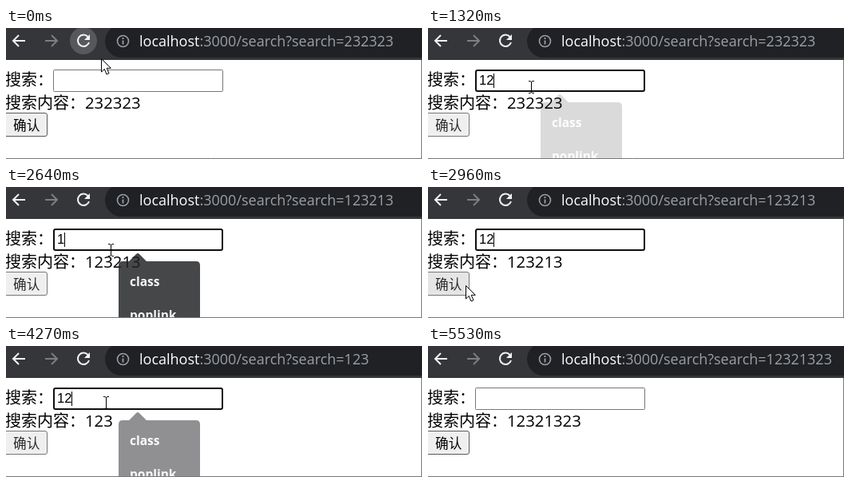
An HTML page that plays this animation: 521 px wide and 164 px high, repeating every 5.87 s.

```html
<!DOCTYPE html>
<html lang="zh-CN">
<head>
<meta charset="utf-8">
<title>Search</title>
<style>
html, body { margin: 0; width: 100%; height: 100%; overflow: hidden; background: #fff; }
svg { display: block; }
text { white-space: pre; }
.url { font: 18px "Open Sans", "Noto Sans", sans-serif; fill: #9aa0a6; }
.zh { font: 300 20px "Noto Sans CJK SC", "Noto Sans CJK", sans-serif; }
.num { font: 20.3px "Open Sans", "Noto Sans", sans-serif; }
.field { font: 16.67px "Liberation Sans", Arial, sans-serif; }
.btn { font: 300 16.67px "Noto Sans CJK SC", "Noto Sans CJK", sans-serif; }
.item { font: bold 15.5px "Open Sans", "Noto Sans", sans-serif; fill: #f4f5f6; }
.icon { fill: none; stroke: #f1f3f4; stroke-width: 2; }
</style>
</head>
<body>
<svg width="521" height="164" viewBox="0 0 521 164">
  <rect width="521" height="40" fill="#35363a"/>
  <rect x="124" y="-4" width="440" height="41" rx="20.5" fill="#202124"/>
  <path class="icon" d="M24 16H9M16 9l-7 7 7 7"/>
  <path class="icon" d="M49 16H64M57 9l7 7-7 7" style="stroke:#7d7e82"/>
  <circle id="halo" cx="97" cy="16" r="17" fill="#57585c"/>
  <path class="icon" d="M102.500 11A7.200 7.200 0 1 0 104 18"/>
  <path d="M105 8v7h-7z" fill="#f1f3f4"/>
  <circle cx="146.500" cy="16.500" r="7" fill="none" stroke="#9aa0a6" stroke-width="1.600"/>
  <path d="M146.500 12v2M146.500 15.500v5" stroke="#9aa0a6" stroke-width="1.800"/>
  <text class="url" x="167" y="23"><tspan fill="#fff">localhost</tspan>:3000/search?search=<tspan id="query"></tspan></text>

  <text class="zh" x="-1" y="72">搜索：</text>
  <rect id="box" fill="#fff"/>
  <text id="typed" class="field" x="64" y="71"></text>
  <path id="caret" d="M.5 57V75" stroke="#000"/>
  <text class="zh" x="-1" y="101">搜索内容：</text>
  <text id="result" class="num" x="99" y="101"></text>
  <rect id="button" x="-3.500" y="106.500" width="55" height="29" rx="2.500"/>
  <text id="label" class="btn" x="9" y="128">确认</text>

  <g id="popup">
    <path d="M146 93H154L163 84Q165 82 167 84L176 93H238Q243 93 243 98V170H141V98Q141 93 146 93Z" fill="#202124"/>
    <text class="item" x="155" y="124">class</text>
    <text class="item" x="155" y="166">poplink</text>
  </g>
  <path d="M0 163.500H521M520.500 40V164" stroke="#77787b"/>

  <g id="mouse">
    <path id="arrow" d="M.5 .5V17L4.300 13.400 7 20 10 18.700 7.200 12.300H12.300Z" fill="#fff" stroke="#000"/>
    <path id="beam" d="M-3-7.500H-1L.5-6.500 2-7.500H4M.5-6.500V6.500M-3 7.500H-1L.5 6.500 2 7.500H4" fill="none" stroke="#000"/>
  </g>
</svg>
<script>
const LOOP = 5870;
const $ = id => document.getElementById(id);
const set = (id, attrs) => {
  for (const k in attrs) $(id).setAttribute(k, attrs[k]);
};
const clamp = v => Math.max(0, Math.min(1, v));
const ease = v => v * v * (3 - 2 * v);

// Each search: click into the field, type at a steady pace, go to the button, send.
const rounds = [
  { text: "123213", focus: 860, type: 1170, pace: 100, go: 1400, send: 1820, home: [129, 74] },
  { text: "123", focus: 2370, type: 2610, pace: 200, go: 2660, send: 3370, home: [131, 79] },
  { text: "12321323", focus: 3940, type: 4180, pace: 85, go: 4625, send: 5090, home: [125, 71] }
];

// The pointer glides from stop to stop.
const button = [47, 123];
const glides = [{ at: 30, span: 150, to: [123, 70] }];
rounds.forEach((r, i) => {
  const back = i ? rounds[i - 1].send + 20 : 350;
  glides.push({ at: back, span: 400, to: r.home }, { at: r.go, span: 300, to: button });
});
glides.push({ at: 5350, span: 180, to: [436, 172] });

const pointerAt = t => glides.reduce((pos, g) => {
  const k = ease(clamp((t - g.at) / g.span));
  return pos.map((v, i) => v + (g.to[i] - v) * k);
}, [119, 38]);

function draw(t) {
  const sent = rounds.filter(r => t >= r.send).pop();
  $("query").textContent = $("result").textContent = sent ? sent.text : "232323";

  const now = rounds.find(r => t >= r.focus && t < r.send);
  const count = now ? Math.max(0, Math.floor((t - now.type) / now.pace) + 1) : 0;
  const typed = now ? now.text.slice(0, count) : "";
  $("typed").textContent = typed;
  const end = 64 + Math.floor(typed.length * 9.27);
  set("caret", { transform: `translate(${end})`, opacity: now ? 1 : 0 });
  set("popup", { opacity: now ? 1 - clamp((t - now.type) / 180) : 0 });

  const [x, y] = pointerAt(t);
  const inField = x > 59 && x < 272 && y > 52 && y < 80;
  const onButton = x < 52 && y > 106 && y < 136;
  const overText = x < 272 && y > 52 && y < 106;
  set("box", now
    ? { x: 60, y: 53, width: 211, height: 26, rx: 2, stroke: "#101010", "stroke-width": 2 }
    : { x: 59.5, y: 52.5, width: 212, height: 27, rx: 1, stroke: inField ? "#5c5c5c" : "#767676", "stroke-width": 1 });
  set("button", { fill: onButton ? "#e5e5e5" : "#efefef", stroke: now ? "#767676" : "#5a5a5a" });
  set("label", { fill: now ? "#2a2a2a" : "#000" });

  set("halo", { opacity: 1 - clamp((t - 350) / 150) });
  set("mouse", { transform: `translate(${Math.round(x)} ${Math.round(y)})` });
  set("arrow", { opacity: overText ? 0 : 1 });
  set("beam", { opacity: overText ? 1 : 0 });
}

const start = performance.now();
function tick() {
  draw((performance.now() - start) % LOOP);
  requestAnimationFrame(tick);
}
tick();
</script>
</body>
</html>
```
